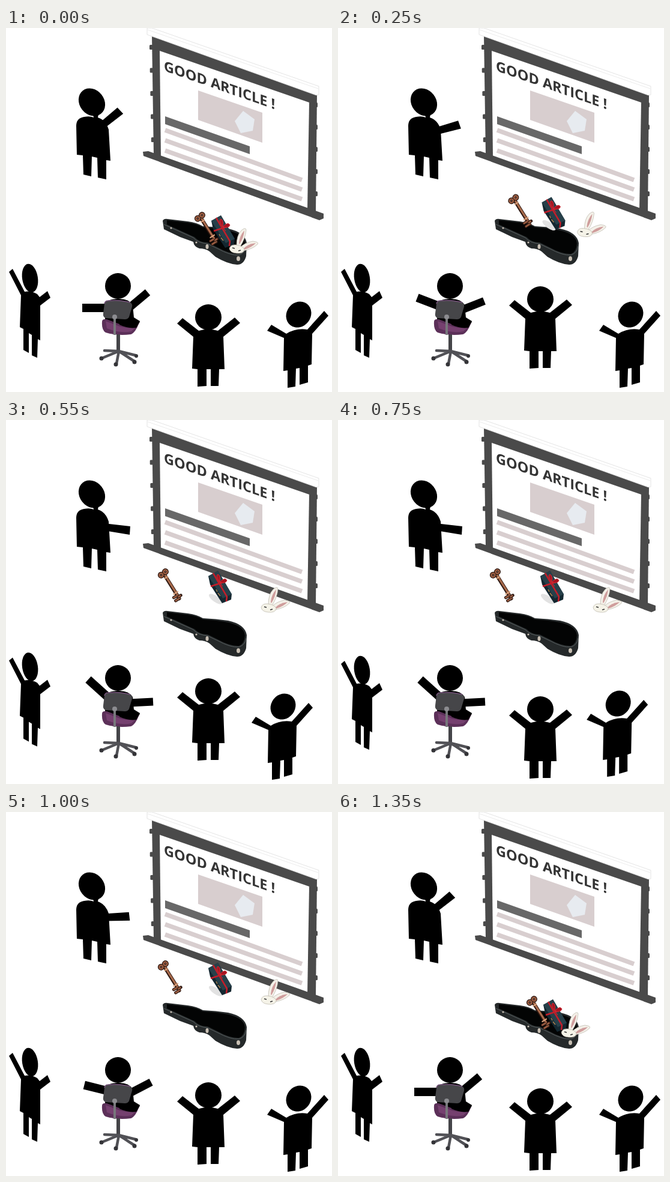
These frames come from a looping animation (543 px wide and 606 px high, 1400 ms). An HTML page:

```html
<!DOCTYPE html>
<html lang="en">
<head>
<meta charset="utf-8">
<title>Good article</title>
<style>
html, body { margin: 0; width: 100%; height: 100%; overflow: hidden; background: #fff; }
svg { display: block; width: 100%; height: 100%; }
text { font: bold 23.5px "Open Sans", sans-serif; fill: #343434; }
</style>
</head>
<body>
<svg viewBox="0 0 543 606" xmlns="http://www.w3.org/2000/svg">
  <g fill="#4a4a4a">
    <path d="M243 12L518 110L516 309L246 212Z"/>
    <path d="M256 38L505 124L502 302L258 215Z" fill="#fff"/>
    <path d="M228 206L237 205L529 309V317L522 320L229 213Z"/>
    <path d="M235 0H243L521 97V111L517 112L235 11Z" fill="#fff" stroke="#ddd" stroke-width=".8"/>
    <path d="M236 3L520 101" stroke="#e6e6e6" stroke-width=".8"/>
    <g id="knobs"></g>
    <path d="M320 104L427 141V191L320 153Z" fill="#d8cecf"/>
    <path d="M395 138L414 152L411 171L391 175L381 155Z" fill="#e7ebf0"/>
    <path d="M265 147L406 197V210L265 160Z" fill="#686868"/>
    <g id="lines" stroke="#d8cecf" stroke-width="7.5"></g>
    <text transform="translate(263 71) skewY(19.2)">GOOD ARTICLE !</text>
  </g>

  <g>
    <ellipse cx="143" cy="123.500" rx="20.500" ry="24.500" transform="rotate(-38 143 123.500)"/>
    <path d="M117 163Q117 150 130 148Q140 146 146 149L145 144H154L153 149Q166 153 171 169L174 221L167 220V252L153 249L152 216L143 214L142 247L129 244L128 212L118 211Z"/>
    <path id="point" d="M-42-6L0-7L1 7L-42 6Z"/>
  </g>

  <g>
    <path d="M261 321Q263 317 269 318L303 322Q318 324 328 330Q350 331 370 334Q398 340 401 358L400 380Q396 394 385 394Q369 393 349 381L339 372Q332 367 322 367Q313 364 312 356L290 348L263 335Z" fill="#25292a"/>
    <path d="M268 320L302 324Q318 326 328 332Q350 333 370 337Q397 343 398 359Q397 373 388 376Q374 377 352 365L336 357Q322 357 314 348L268 327Z" fill="#030404"/>
    <path d="M263 327L312 349Q320 358 335 359L352 367Q374 379 388 378Q399 374 400 363" fill="none" stroke="#596061"/>
    <g fill="#c9c0b4"><ellipse cx="335" cy="364" rx="2.500" ry="4"/><ellipse cx="387" cy="384" rx="3" ry="4"/><circle cx="317" cy="357" r="1.600"/><circle cx="275" cy="333" r="1.600"/></g>
  </g>

  <g id="key">
    <g transform="translate(322 312) rotate(58)" fill="none" stroke-linecap="round">
      <path d="M4 0H52" stroke="#2c1711" stroke-width="6"/>
      <path d="M4 -.5H52" stroke="#a86a4b" stroke-width="3.200"/>
      <g stroke="#2c1711" stroke-width="5"><circle cx="2" cy="-4" r="3"/><circle cx="3" cy="5" r="3"/><path d="M46 2V7M52 2V7M49 -5V-2"/></g>
      <g stroke="#9a5d42" stroke-width="2.600"><circle cx="2" cy="-4" r="3"/><circle cx="3" cy="5" r="3"/><path d="M46 1V7M52 1V7M49 -4V-1"/></g>
      <path d="M11 -3V3M41 -4V4" stroke="#dca580" stroke-width="2"/>
    </g>
  </g>

  <g id="gift">
    <ellipse id="shade" cx="354" cy="359" rx="13" ry="5" fill="#e2e2e2" transform="rotate(35 354 359)"/>
    <path d="M342 321L358 312L381 351L380 360L365 366L345 335Z" fill="#142730"/>
    <path d="M342 321L358 312L381 351L366 358Z" fill="#27404a"/>
    <path d="M350 316L373 355L372 363M346 338L355 335L370 330" fill="none" stroke="#c41d29" stroke-width="2.500"/>
    <path d="M361 331Q353 319 358 318Q363 320 361 331Q370 322 373 328Q371 334 361 331L366 338" fill="#a81420" stroke="#d32a34"/>
    <path d="M358 349L362 354M355 343L357 347" stroke="#b88b54" stroke-width="1.300"/>
  </g>

  <g id="rabbit" stroke="#b9b5aa" stroke-width=".7">
    <path d="M384 362Q384 345 392 337Q399 331 400 336Q399 350 390 364Z" fill="#f4f1e9"/>
    <path d="M388 358Q389 346 397 337Q396 349 389 360Z" fill="#cf9d9c" stroke="none"/>
    <path d="M389 366Q398 357 411 355Q422 356 419 360Q411 368 395 371Z" fill="#f4f1e9"/>
    <path d="M396 367Q402 360 416 358Q410 365 397 369Z" fill="#cf9d9c" stroke="none"/>
    <path d="M372 367Q374 360 383 361Q396 363 397 369Q396 376 384 375Q373 374 372 367Z" fill="#f5f3e8"/>
    <path d="M377 366L381 367M387 371L391 370" stroke="#333" stroke-width="1.500"/>
  </g>

  <g id="left">
    <ellipse cx="40" cy="416.500" rx="13" ry="24" transform="rotate(-9 40 416.500)"/>
    <path d="M5 406L11 401L31 439Q42 437 52 443L56 448L69 438L74 449L57 462V520L53 518L52 549L43 545V511L38 508V541L29 536V501L23 498L25 445Z"/>
  </g>

  <g>
    <ellipse cx="186.500" cy="429.500" rx="21.500" ry="21.500"/>
    <path d="M165 457Q175 450 187 451Q204 450 211 461L213 482L223 489L217 500L165 494Z"/>
    <path id="armL" d="M0-7H44V7H0Z"/>
    <path id="armR" d="M-44-6.500H0V6.500H-44Z"/>
    <path d="M160 489Q160 484 168 485L192 494Q214 497 222 490Q216 507 208 510Q185 513 166 507Q159 503 160 489Z" fill="#5c3059"/>
    <path d="M166 488L190 497Q208 501 216 498L209 505Q190 509 168 500Z" fill="#75406f"/>
    <path d="M190 482H213L223 488L217 499Q204 501 189 494Z"/>
    <path d="M168 454Q188 451 207 457Q211 459 210 464L205 481Q203 485 198 485L166 483Q161 481 162 475L164 459Q165 455 168 454Z" fill="#464649"/>
    <path d="M164 459Q165 454 170 454Q190 452 207 457" fill="none" stroke="#75517a" stroke-width="1.600"/>
    <path d="M181 481V511" stroke="#77777b" stroke-width="4"/>
    <circle cx="181" cy="481" r="4" fill="#8c8c90"/>
    <path d="M187 510V538" stroke="#444448" stroke-width="6"/>
    <path d="M188 538L159 550M188 538L184 559M188 538L214 555M188 538L216 545M188 538L164 537" fill="none" stroke="#515156" stroke-width="4.500" stroke-linecap="round"/>
    <g fill="#343438"><circle cx="159" cy="550" r="3.500"/><circle cx="183" cy="560" r="3.500"/><circle cx="214" cy="556" r="3.500"/><circle cx="217" cy="546" r="3"/></g>
  </g>

  <g id="middle">
    <ellipse cx="337" cy="481.500" rx="22" ry="21.500"/>
    <path d="M285 492L294 483L321 504Q337 499 353 504L381 482L390 491L362 514L364 568H355L354 596H341V568H334V596L319 597V568L310 567L312 514Z"/>
  </g>

  <g id="right">
    <ellipse cx="487.500" cy="477" rx="20" ry="22.500" transform="rotate(38 487.500 477)"/>
    <path d="M435 504L442 494L467 509Q483 499 502 502L530 471L537 479L510 509L509 560L503 562V590L489 594V566L483 567L482 597L469 599V570L462 571L463 516Z"/>
  </g>
</svg>
<script>
const LOOP = 1400, STEP = 50;
const el = id => document.getElementById(id);

// 0 to 1 between two times, held outside them
const ramp = (t, from, to) => Math.min(1, Math.max(0, (t - from) / (to - from)));
// goes out from a to b, waits, comes back from c to d
const trip = (t, a, b, c, d) => ramp(t, a, b) - ramp(t, c, d);
const mix = (a, b, u) => a + (b - a) * u;

function place(id, x, y, turn = 0) {
  el(id).setAttribute("transform", `translate(${x} ${y}) rotate(${turn})`);
}

// Moves an arm's tip around a point and tilts the arm with it.
function swing(id, from, to, bulge, u) {
  const [x, y, turn] = from.map((v, i) => mix(v, to[i], u));
  place(id, x + bulge * Math.sin(Math.PI * u), y, turn);
}

function draw(t) {
  const aim = trip(t, 0, 500, 900, 1350);
  swing("point", [190, 138, -39], [206, 184, 8], 4, aim);

  const cheer = trip(t, 0, 500, 800, 1100);
  swing("armL", [127, 466, 0], [137, 432, 42], 0, cheer);
  swing("armR", [236, 440, -40], [245, 469, -3], 3, cheer);

  const lift = trip(t, 0, 500, 1000, 1150);
  place("key", -61 * lift, -59 * lift);
  place("gift", -5 * lift, -61 * lift);
  place("rabbit", 53 * lift, -55 * lift);
  el("shade").setAttribute("opacity", ramp(lift, 0, .5));

  const sway = trip(t, 300, 550, 700, 950);
  place("right", -26 * sway, -8.5 * Math.sin(Math.PI * sway));
  place("left", 0, -5.5 * trip(t, 450, 550, 600, 700));
  place("middle", 0, -30 * trip(t, 0, 250, 550, 750) - 10 * trip(t, 850, 1000, 1200, 1350));
}

const knob = (x, y) => `<rect x="${x}" y="${y}" width="6" height="8" rx="1.5"/>`;
for (let i = 0; i < 5; i++)
  el("knobs").innerHTML += knob(239 + i * .7, 28 + i * 38.5) + knob(513, 124 + i * 37);
for (let i = 0; i < 3; i++)
  el("lines").innerHTML += `<path d="M265 ${170 + i * 17}L493 ${253 + i * 16}"/>`;

const start = performance.now();
function tick() {
  const t = (performance.now() - start) % LOOP;
  draw(Math.floor(t / STEP) * STEP);
  requestAnimationFrame(tick);
}
draw(0);
requestAnimationFrame(tick);
</script>
</body>
</html>
```
